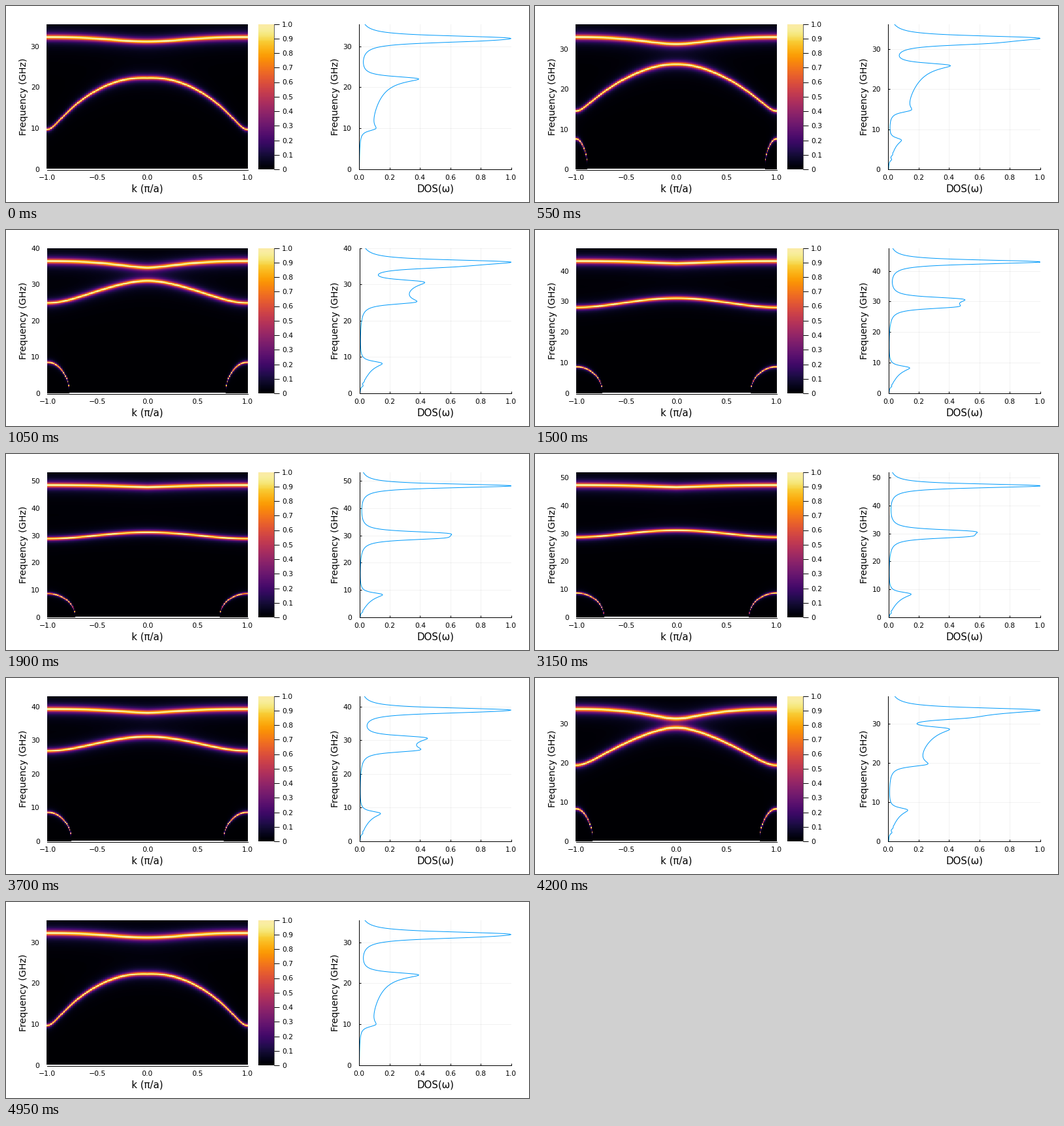
A matplotlib script that plays this animation: 800x300 px, repeating every 5000 ms.

```python
import numpy as np
import matplotlib.pyplot as plt
from matplotlib.animation import FuncAnimation
from matplotlib.colors import ListedColormap
from matplotlib.lines import Line2D

W, H, DPI = 800, 300, 100
FRAMES, INTERVAL = 100, 50
COLS, ROWS = 201, 300
TOP, BOTTOM = 27.5, 250
PX = 72 / DPI  # one pixel in points

plt.rcParams.update({
    "font.family": "DejaVu Sans",
    "font.size": 10.8 * PX,
    "axes.linewidth": PX,
})

k = np.linspace(-1, 1, COLS)
x = 1 - np.abs(k)


def even(c0, c2, c4=0, c6=0):
    """Even polynomial around the zone edge."""
    return c0 + c2 * x**2 + c4 * x**4 + c6 * x**6


# Dynamical matrix: a stiff mode coupled to a soft one and a flat one.
stiff = even(66.6, -280, 64)
soft = even(76, -534, -247, 226)
flat = 912 + 54 * np.cos(np.pi * k / 2) ** 2
to_soft = np.sqrt(even(3190, 9.0e5, -2.636e5, -7.5e3))
to_flat = np.sqrt(2000 + 1.2e5 * np.sin(np.pi * k / 2) ** 2)


def bands(i):
    """Mode frequencies (COLS, 3); unstable modes are set to zero."""
    s = (1 - np.cos(2 * np.pi * i / (FRAMES - 1))) / 2
    m = np.zeros((COLS, 3, 3))
    m[:, 0, 0] = stiff + 2510 * s
    m[:, 1, 1] = soft
    m[:, 2, 2] = flat
    m[:, 0, 1] = m[:, 1, 0] = to_soft
    m[:, 0, 2] = m[:, 2, 0] = to_flat
    return np.sqrt(np.clip(np.linalg.eigvalsh(m), 0, None))


def lorentz(w, w0, width):
    return width**2 / ((w[:, None] - w0) ** 2 + width**2)


def spectrum(i):
    w0 = bands(i)
    top = 1.1 * w0.max()
    w = np.linspace(0, top, ROWS)
    heat = np.zeros((ROWS, COLS))
    dos = np.zeros(ROWS)
    for band in w0.T:
        live = band > 0
        f = band[live]
        heat[:, live] += lorentz(w, f, 0.15 + 0.012 * f)
        blur = (0.3 + 0.0085 * top) * np.tanh(f / 3)
        dos += lorentz(w, f, blur).sum(axis=1)
    heat[0, w0[:, 0] == 0] = np.nan
    return w, heat, dos / dos.max(), top


def inferno_cream():
    """Inferno with its last tenth fading to cream."""
    u = np.linspace(0, 1, 256)
    rgb = plt.get_cmap("inferno")(u)[:, :3]
    t = np.clip((u - 0.88) / 0.12, 0, 1)[:, None]
    cream = np.array([0.985, 0.92, 0.65])
    cmap = ListedColormap(rgb * (1 - t) + cream * t)
    cmap.set_bad("white")
    return cmap


def box(left, right):
    return [left / W, 1 - BOTTOM / H, (right - left) / W, (BOTTOM - TOP) / H]


def label(px, py, text, size, rotation=0):
    return fig.text(px / W, 1 - py / H, text, fontsize=size * PX,
                    rotation=rotation, ha="center", va="center")


fig = plt.figure(figsize=(W / DPI, H / DPI), dpi=DPI, facecolor="white")
cmap = inferno_cream()

# Band map
ax = fig.add_axes(box(62.4, 370))
ax.set_xlim(-1.005, 1.005)
ax.set_xticks([-1, -0.5, 0, 0.5, 1], ["−1.0", "−0.5", "0.0", "0.5", "1.0"])
ax.tick_params(length=0)
ax.tick_params(axis="x", pad=7.5 * PX)
ax.tick_params(axis="y", pad=11 * PX)
for spine in ax.spines.values():
    spine.set_visible(False)
image = ax.imshow(np.zeros((ROWS, COLS)), cmap=cmap, vmin=0, vmax=1,
                  origin="lower", aspect="auto", interpolation="nearest")
fig.add_artist(Line2D([62.5 / W, 370 / W], [1 - (BOTTOM + 0.5) / H] * 2,
                      color="black", lw=PX))

# Colour scale
bar = fig.add_axes(box(386, 410))
bar.imshow(np.linspace(0, 1, 256)[:, None], cmap=cmap, origin="lower",
           aspect="auto", extent=(0, 1, 0, 1))
bar.set_xticks([])
bar.yaxis.tick_right()
bar.set_yticks(np.arange(11) / 10, ["0"] + [f"{n / 10:.1f}" for n in range(1, 11)])
bar.tick_params(axis="y", length=8 * PX, width=PX, pad=4 * PX)
for side in ("left", "top", "bottom"):
    bar.spines[side].set_visible(False)
bar.spines["right"].set_linewidth(0.6 * PX)

# Density of states
dx = fig.add_axes(box(540, 772.5))
dx.set_xlim(0, 1)
dx.set_xticks(np.arange(6) / 5, [f"{n / 5:.1f}" for n in range(6)])
dx.tick_params(direction="in", length=3 * PX, width=PX)
dx.tick_params(axis="x", pad=7.5 * PX)
dx.tick_params(axis="y", pad=11.5 * PX)
dx.grid(color="black", alpha=0.05, lw=PX)
dx.set_axisbelow(True)
dx.spines[["top", "right"]].set_visible(False)
curve, = dx.plot([], [], color="#009AFA", lw=PX)

label(216.5, 280, "k (π/a)", 15)
label(656.5, 280, "DOS(ω)", 15)
label(26.5, 139, "Frequency (GHz)", 14.3, 90)
label(504, 139, "Frequency (GHz)", 14.3, 90)


def update(n):
    w, heat, dos, top = spectrum(min(n, FRAMES - 1 - n))
    shift = 0.6 if top >= 40 else 0
    ax.set_position(box(62.4 + shift, 370))
    dx.set_position(box(540 + shift, 772.5))
    image.set_data(np.ma.masked_invalid(np.clip(heat, 0, 1)))
    image.set_extent((-1.005, 1.005, 0, top))
    curve.set_data(dos, w)
    for a in (ax, dx):
        a.set_ylim(0, top)
        a.set_yticks(np.arange(0, top, 10))
    return image, curve


anim = FuncAnimation(fig, update, frames=FRAMES, interval=INTERVAL,
                     init_func=lambda: update(0), repeat=True, repeat_delay=0)
plt.show()
```
